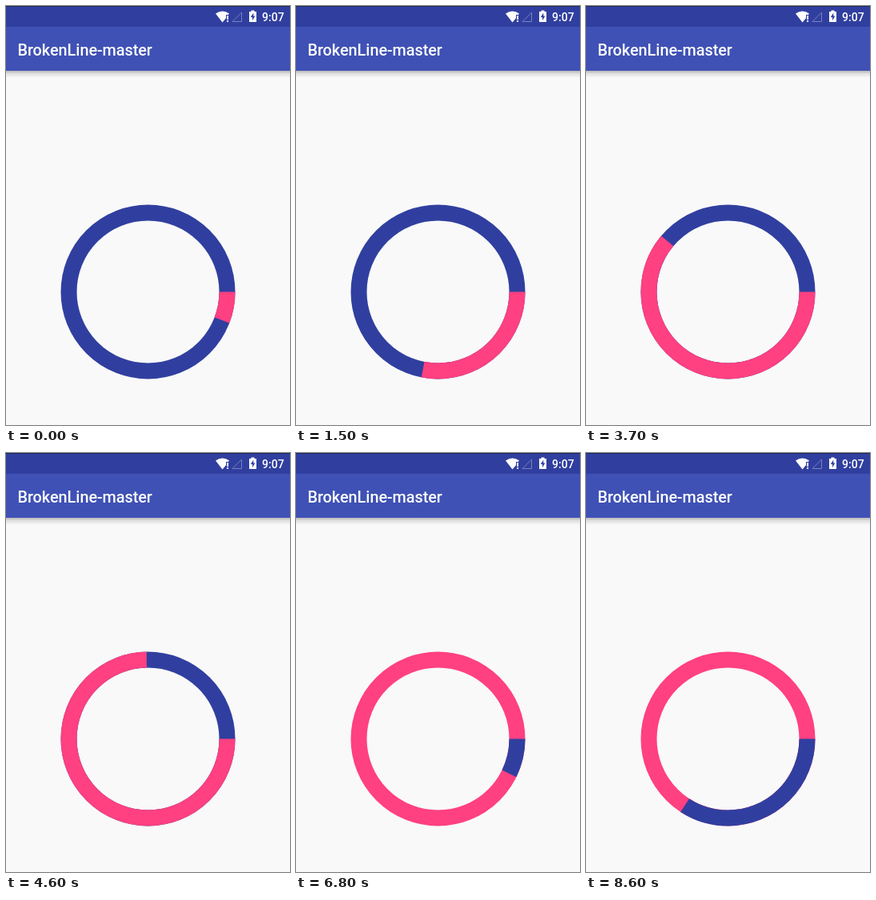
Animation, 355 px wide and 524 px high, one loop 8700 ms. Source, as an HTML page:

```html
<!DOCTYPE html>
<html lang="en">
<head>
<meta charset="utf-8">
<title>Ring progress</title>
<style>
  html, body { margin: 0; height: 100%; overflow: hidden; background: #f9f9f9; }
  svg { display: block; width: 100vw; height: 100vh; }
  text { font-family: Roboto, sans-serif; font-weight: 500; fill: #fff; }
  .ring { fill: none; stroke-width: 20; }
</style>
</head>
<body>
<svg viewBox="0 0 355 524">
  <defs>
    <linearGradient id="shadow" x2="0" y2="1">
      <stop offset="0" stop-opacity=".27"/>
      <stop offset=".4" stop-opacity=".1"/>
      <stop offset="1" stop-opacity="0"/>
    </linearGradient>
  </defs>

  <rect width="355" height="524" fill="#f9f9f9"/>
  <rect y="81" width="355" height="9" fill="url(#shadow)"/>
  <rect width="355" height="81" fill="#3f51b5"/>
  <rect width="355" height="26" fill="#303f9f"/>
  <rect width="355" height="1" fill="#1f2757"/>

  <!-- Wi-Fi, signal and battery -->
  <path d="M262 9.5Q270.5 3.5 279 9.5L277.8 11H275V15.2L270.5 20.5Z" fill="#fff"/>
  <path d="M276 12h2v5h-2zM276 18h2v2h-2z" fill="#fff"/>
  <path d="M283 19.5L294.5 8V19.5Z" fill="none" stroke="#7781c0"/>
  <path d="M304 7H306.5V5.5H310.5V7H313V20H304Z" fill="#fff"/>
  <path d="M309.3 8.5L305.8 14H308V18.3L311.3 12.6H309.3Z" fill="#303f9f"/>

  <text x="320" y="19" font-size="14">9:07</text>
  <text x="14.5" y="61.5" font-size="19.8">BrokenLine-master</text>

  <circle id="base" class="ring" cx="177.5" cy="357.5" r="99"/>
  <circle id="sweep" class="ring" cx="177.5" cy="357.5" r="99" pathLength="360"/>
</svg>
<script>
  const BLUE = '#303f9f', PINK = '#ff4081';
  const STEP = 100, STEPS = 87;
  // [step, degrees]: a nearly steady sweep of about 5.4 degrees per step
  const KEYS = [[0, 21], [9, 70], [15, 101], [18, 118], [27, 167], [36, 215],
                [46, 269], [55, 317], [68, 386], [72, 408], [81, 457], [86, 483]];
  const base = document.getElementById('base');
  const sweep = document.getElementById('sweep');

  function angleAt(step) {
    const i = Math.max(1, KEYS.findIndex(key => key[0] >= step));
    const [s0, a0] = KEYS[i - 1], [s1, a1] = KEYS[i];
    return Math.round(a0 + (a1 - a0) * (step - s0) / (s1 - s0));
  }

  function draw() {
    const angle = angleAt(Math.floor(performance.now() / STEP) % STEPS);
    const firstTurn = angle < 360;
    base.setAttribute('stroke', firstTurn ? BLUE : PINK);
    sweep.setAttribute('stroke', firstTurn ? PINK : BLUE);
    sweep.setAttribute('stroke-dasharray', `${angle % 360} 360`);
    requestAnimationFrame(draw);
  }
  draw();
</script>
</body>
</html>
```
